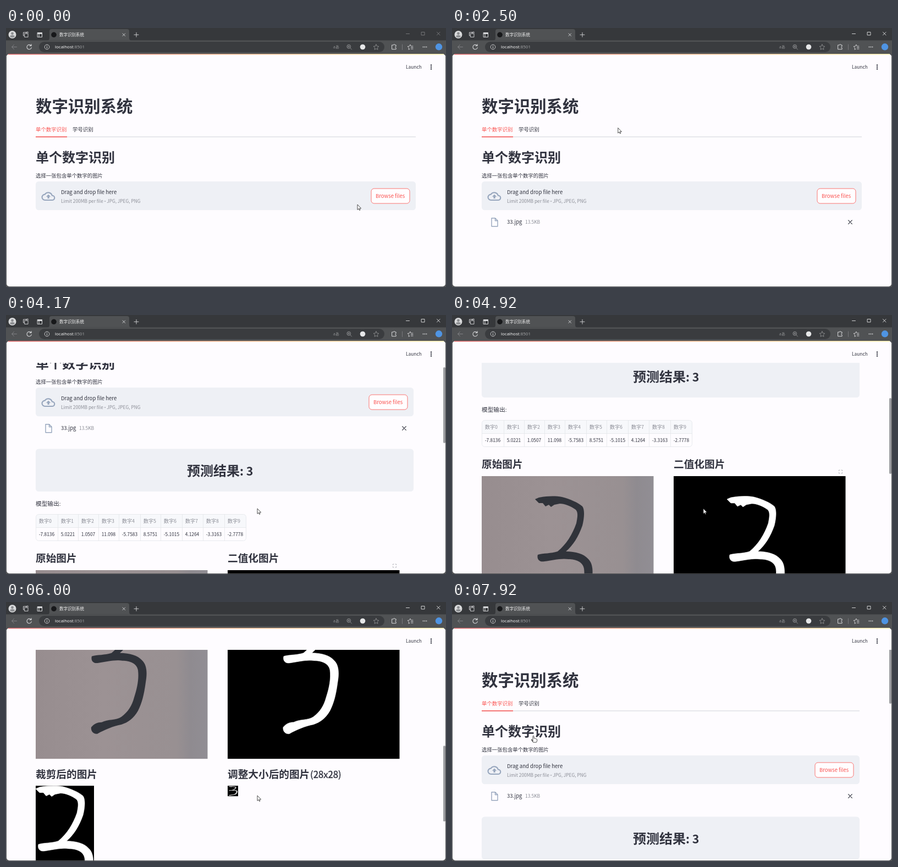
These frames come from a looping animation (800 px wide and 471 px high, 8 s). An HTML page:

```html
<!DOCTYPE html>
<html lang="zh-CN">
<head>
<meta charset="utf-8">
<title>数字识别系统</title>
<style>
html, body { margin: 0; width: 100%; height: 100%; overflow: hidden; background: #505254; }
svg { position: absolute; left: 0; top: 0; width: 800px; height: 471px; display: block; }
text { white-space: pre; }
.page { font-family: "Noto Sans CJK SC", "Noto Sans CJK JP", sans-serif; fill: #31333f; }
.ui { font-family: "Open Sans", "Noto Sans CJK SC", sans-serif; fill: #1c1c1e; }
.line { fill: none; stroke-linecap: round; stroke-linejoin: round; }
#dialog { filter: drop-shadow(0 9px 11px rgba(0, 0, 0, .42)); transform-origin: 259px 160px; }
</style>
</head>
<body>
<svg id="stage" viewBox="0 0 800 471"></svg>
<script>
const FPS = 12, FRAMES = 96;
const INK = '#31333f', GREY = '#8b8d96', RED = '#fa5350', BOX = '#eef0f5', STEEL = '#97a6bd';
// Outline of the handwritten digit
const THREE = 'M151 104L158 101C175 98 188 98 200 100C215 104 229 110 237 117C242 124 240 140 237 152' +
  'C230 172 220 188 207 199C225 199 240 204 247 212C256 220 257 235 254 252C251 275 247 290 240 304' +
  'C232 318 222 325 210 329C195 332 180 338 166 346C158 347 154 340 155 334C160 328 166 325 174 325' +
  'C185 319 200 322 210 315C222 306 229 295 233 280C239 262 242 245 240 230C238 218 225 213 212 213' +
  'C198 211 182 215 168 217C158 219 154 212 156 205C166 202 180 203 192 199C208 186 219 168 226 148' +
  'C228 138 230 128 225 123C215 116 205 112 196 112L186 114L180 118L176 114L170 117L165 111L158 111z';

const rect = (x, y, w, h, fill, more = '') =>
  `<rect x="${x}" y="${y}" width="${w}" height="${h}" fill="${fill}" ${more}/>`;
const circle = (x, y, r, fill, more = '') => `<circle cx="${x}" cy="${y}" r="${r}" fill="${fill}" ${more}/>`;
const line = (d, color, w = 1, more = '') =>
  `<path class="line" d="${d}" stroke="${color}" stroke-width="${w}" ${more}/>`;
const text = (x, y, size, s, more = '') => `<text x="${x}" y="${y}" font-size="${size}" ${more}>${s}</text>`;
// Latin runs are set smaller than the Chinese around them
const mixed = (x, y, size, s, more) => text(x, y, size,
  s.replace(/[\x20-\x7e]+/g, m => `<tspan font-size="${size * .895}">${m}</tspan>`), more);
const bold = 'font-weight="700"';
const three = (color, edge, transform) =>
  `<path d="${THREE}" fill="${color}" stroke="${color}" stroke-width="${edge}" transform="${transform}"/>`;

function table() {
  const edges = [54, 94, 131, 168, 205, 244, 281, 320, 358, 397, 437];
  const cells = '-7.8136 5.0221 1.0507 11.098 -5.7583 8.5751 -5.1015 4.1264 -3.3163 -2.7778'.split(' ');
  return rect(54.5, 509.5, 382, 48, '#fefcff', 'rx="5"') +
    `<path d="M54.5 533.5V514q0-4.5 4.5-4.5H432q4.5 0 4.5 4.5V533.5z" fill="#f7f8fb"/>` +
    line('M54.5 533.5H436.5' + edges.slice(1, -1).map(x => `M${x + .5} 509.5V557.5`).join(''), '#e4e6ea', .8) +
    rect(54.5, 509.5, 382, 48, 'none', 'rx="5" stroke="#e4e6ea" stroke-width=".8"') +
    cells.map((v, i) => mixed(edges[i] + 5.7, 524.6, 9.33, '数字' + i, `fill="${GREY}"`) +
      mixed(edges[i] + 5.7, 549, 9.33, v)).join('');
}

function results() {
  return rect(54, 390.5, 687, 77.5, BOX, 'rx="5.3"') +
    mixed(329, 438.6, 24, '预测结果: 3', bold) +
    mixed(54, 493.5, 10.67, '模型输出:') + table() +
    mixed(54, 596, 18.67, '原始图片', bold) + mixed(403, 596, 18.67, '二值化图片', bold) +
    line('M703.5 601.5v-1.5h1.5M708 600h1.5v1.5M709.5 604.5v1.5h-1.5M705 606h-1.5v-1.5', '#a3a4ab', .8) +
    rect(54, 611, 312.5, 329.5, 'url(#paper)') + three('#30333a', .1, 'translate(0 549)') +
    rect(403, 611, 312.5, 329.5, '#000') + three('#fff', .6, 'translate(349 549)') +
    mixed(54, 975, 18.67, '裁剪后的图片', bold) +
    mixed(403, 975, 18.67, '调整大小后的图片', bold) +
    mixed(553, 975, 18.67, '(28x28)', `stroke="${INK}" stroke-width=".4"`) +
    rect(54, 989.5, 106, 249, '#000') +
    `<g clip-path="url(#crop)">${three('#fff', .6, 'translate(-97 891)')}</g>` +
    rect(403, 989.5, 19, 19, '#000') + three('#cfcfcf', 1, 'translate(380.7 983.6) scale(.158 .069)');
}

function page() {
  return `<g class="page" clip-path="url(#view)">${rect(0, 47, 800, 424, '#fefcff')}
  <g id="content">
    ${text(54, 153.2, 29.4, '数字识别系统', bold)}
    ${text(54, 187.5, 9.4, '单个数字识别', `fill="${RED}"`)}${text(121, 187.5, 9.4, '学号识别')}
    ${rect(54, 197.3, 691, 1.3, '#dddee3', 'class="wide"')}${rect(54, 197.2, 57, 1.5, RED)}
    ${text(54, 244.2, 24, '单个数字识别', bold)}
    ${text(54, 271.5, 9.38, '选择一张包含单个数字的图片')}
    ${rect(54, 279, 691, 52.3, BOX, 'rx="5.3" class="wide"')}
    <g transform="translate(64.6 293.3) scale(1.04)">
      ${line('M6 19a5 5 0 0 1-.2-10a7 7 0 0 1 12.7 2a4 4 0 0 1 .5 8z', STEEL, 2)}
      <path d="M8 13h2.5v3h3v-3H16l-4-4z" fill="${STEEL}"/>
    </g>
    ${mixed(100, 302, 10.67, 'Drag and drop file here')}
    ${text(100, 318.3, 8.36, 'Limit 200MB per file <tspan font-family="Noto Sans, sans-serif" font-size="7">•</tspan> JPG, JPEG, PNG', `fill="${GREY}"`)}
    <g id="browse">${rect(664, 292, 70, 27, '#fffdff', `rx="5.3" stroke="${RED}" stroke-width=".8"`)}
      ${mixed(672, 309.2, 10.67, 'Browse files', `fill="${RED}"`)}</g>
    <g id="file">
      ${line('M72 345.8h6.5l4.5 4.5v10.4h-11zM78.5 346v4.5h4.5', STEEL, 1.4)}
      ${mixed(100, 356, 10.67, '33.jpg')}${mixed(133, 355.6, 9.33, '13.5KB', `fill="${GREY}"`)}
      ${line('M720.7 349.7l6.6 6.6m0-6.6l-6.6 6.6', INK, 1.2)}
    </g>
    <g id="results">${results()}</g>
  </g>
  ${rect(795, 47, 4, 138, '#9b9ca0', 'rx="2" id="thumb"')}
  ${rect(0, 47, 800, 40, '#fefcff')}
  ${text(727, 74.2, 8.36, 'Launch')}
  ${[67.5, 71, 74.5].map(y => circle(773, y, 1.2, INK)).join('')}
  </g>${rect(4, 47, 792, 1.5, 'url(#glow)')}`;
}

function browser() {
  const w = '#d8d9db', dim = '#97989a';
  return `<g class="ui">${rect(0, 0, 800, 471, '#505254')}${rect(0, 0, 800, 22.5, '#36383b')}` +
    `<path d="M75 22.5q4 0 4-4V6q0-4 4-4H220q4 0 4 4V18.5q0 4 4 4z" fill="#505254"/>` +
    circle(11.5, 12, 7, '#dadbdc') + circle(11.5, 10, 2.4, '#8b8d90') +
    '<path d="M7 15.5q0-2.5 4.5-2.5t4.5 2.5q-4.5 4-9 0z" fill="#8b8d90"/>' +
    line('M33.5 14h-2v-6h6v2M34 10h6v6.500h-6zM36 8l4-1v2', w, .9) +
    line('M57.5 8.5h8v8h-8zM57.5 10.5h8M60 10.5v6', w, 1) + rect(57.5, 8, 8, 2.5, w) +
    circle(87, 12.3, 4.8, '#17181a') +
    text(97, 15, 7.5, '数字识别系统', 'fill="#f2f2f2"') +
    line('M212 10l4.6 4.6m0-4.6l-4.6 4.6', w, .9) + line('M233 12.3h8m-4-4v8', w, .9) +
    `<g id="buttons" class="line" stroke-width=".9"><path d="M727.5 10.5h6M755.5 7.5h5.5v5.5h-5.5zM783.5 7.5l5.5 5.5m0-5.5l-5.5 5.5"/></g>` +
    line('M19.5 34.5h-9m4-4l-4 4l4 4', '#808184', 1) +
    line('M45.5 32a4.2 4.2 0 1 0 .8 3.5M46 29.5v3h-3', w, 1.1) +
    rect(60, 25, 628, 19, '#3a3c3f', 'rx="9.5"') +
    circle(74.5, 34.5, 4.3, 'none', `stroke="${w}" stroke-width=".9"`) + line('M74.5 34v2.5M74.5 32.3v.1', w, 1) +
    text(89, 37.4, 8, 'localhost<tspan fill="#a9aaac">:8501</tspan>', 'fill="#fff"') +
    text(595, 37.3, 7, 'aあ', `fill="${dim}"`) +
    circle(623.3, 33.7, 3.3, 'none', `stroke="${dim}"`) + line('M626 36.5l2.5 2.5M621.8 33.7h3m-1.5-1.5v3', dim, .9) +
    circle(648.5, 34.5, 4.8, '#e6e7e8') +
    line('M673 29.8l1.5 3.2l3.4.4l-2.5 2.4l.6 3.5l-3-1.7l-3 1.7l.6-3.5l-2.5-2.4l3.4-.4z', dim, .8) +
    line('M702 31h2.5a1.3 1.3 0 0 1 2.6 0h2v2.5a1.3 1.3 0 0 0 0 2.6v2.6h-7.1z', w, 1) +
    line('M720.5 30v9.5', '#7c7d80', .9) +
    line('M734 38.3l-2 1l.5-3.4l-2.4-2.3l3.3-.5l1.5-3l1.5 3h3.5M736.5 35.5h3.5M736.5 38h3.5', w, .9) +
    [758.5, 761.5, 764.5].map(x => circle(x, 34.5, .9, w)).join('') +
    circle(787, 34.3, 6.2, '#4f94e3') + '</g>';
}

function folder(cx, inner = '', lip = 86) {
  const x = cx - 25.5;
  return `<path d="M${x} 118V82.500q0-3 3-3h13q2 0 3 1.500l2 2.500h27q3 0 3 3v31z" fill="#eeb644"/>${inner}` +
    `<path d="M${x} ${lip + 4}q0-2 2-2h16q2 0 3-1l1-1h26.500q2.500 0 2.500 2.500V118q0 3-3 3h-45q-3 0-3-3z" fill="url(#folder)"/>`;
}

function files() {
  const label = (cx, y, s) => text(cx, y, 7.5, s, 'text-anchor="middle"');
  const photo = (x, y, w, h, fill) => rect(x + 1, y + 1, w, h, '#c9c9cc', 'rx="1"') + rect(x, y, w, h, fill);
  const preview = cx => rect(cx - 25.5, 86, 51, 22, '#000') +
    line(`M${cx + 20} 88q-6 2-9 8t-5 8`, '#fff', 3.5);
  return folder(140, rect(131, 89, 21, 18, '#4d545b') + rect(136, 93, 10, 10, '#3f78a8'), 102) + folder(208) +
    folder(276, preview(276), 101) + folder(344, preview(344), 101) +
    label(140, 138.3, '__pycache__') + label(208, 138.3, 'data') +
    label(276, 138.3, 'test_after_padd') + label(276, 148.3, 'ing') +
    label(344, 138.3, 'test_before_pa') + label(344, 148.3, 'dding') +
    photo(386, 74.5, 50, 53, '#fff') + line('M407.5 86q2 8 1 23', '#0b0b0b', 3.4) + label(411, 138.3, '1.jpg') +
    photo(452, 77, 53, 50, 'url(#wall)') + line('M477.5 100q4-4 6 0q0 4-5 7.5q4-1 7 0', '#33343a', 1.2) + label(478, 138.3, '2.jpg') +
    photo(114, 156, 52, 53.5, '#fff') + line('M131 168q8 1 16-1q-3 13-4 30', '#0b0b0b', 4) + label(140, 220, '7.jpg') +
    photo(184, 156, 47, 53, 'url(#wall)') + line('M207 180a2 2.5 0 1 0 0 3v-3q0 4-1 8', '#33343a', 1.2) + label(208, 220, '9.jpg') +
    rect(245, 152.5, 63, 73, '#e7eff8', 'rx="2" id="hover"') +
    photo(249.5, 156, 51.5, 53.5, '#9f9899') + three('#2e3138', 3, 'translate(240.5 146.5) scale(.163)') + label(276, 220, '33.jpg') +
    photo(323, 156, 41, 53.5, 'url(#sheet)') + text(329, 183, 4.6, '1 2 3 4 5 6 7 8', 'fill="#55565a"') + label(344, 220, 'whole.jpg');
}

function sidebar() {
  const chevron = (x, y) => line(`M${x - 1.2} ${y - 2.6}l2.6 2.6l-2.6 2.6`, '#707072', .9);
  const drive = y => rect(28.5, y - 1.8, 9, 3.8, '#56585c', 'rx=".8"');
  const item = (x, y, s) => text(x, y + 2.7, 7.6, s);
  const drives = ['Valdora-SSD', 'Data (D:)', 'Game (G:)', 'Work (W:)'];
  return rect(3, 223, 84, 19, '#d9d9da') +
    rect(23.5, 73, 10, 8, '#fbcf55', 'rx="1"') + rect(23.5, 72, 5, 2, '#e8ae3a') + item(36, 77, 'Experience') +
    line('M9 96.5H82', '#dfdfe2', .8) +
    circle(28.5, 116, 4, '#1e86d8') + item(36, 116, 'PeloNube') +
    circle(28.5, 135.5, 4, '#3aa0ea') + item(36, 135.5, 'QLT云盘') +
    rect(23.5, 150.5, 10, 7, '#2f86c5', 'rx="1"') + rect(26, 158, 5, 1.2, '#6b7680') + item(36, 154.8, '此电脑') +
    `<g clip-path="url(#tree)">${drives.map((s, i) => {
      const y = 174.3 + i * 19.5;
      return chevron(18, y) + drive(y) + item(40.5, y, s);
    }).join('')}</g>` + rect(28.5, 170, 4, 2, '#1e86d8') +
    rect(23.5, 248, 8, 6, '#2f86c5') + circle(31, 254, 2.8, '#3fa7d8') + item(36, 252.3, '网络') +
    [116, 135.5, 252.3].map(y => chevron(13, y)).join('') +
    line('M10.5 153.5l2.6 2.6l2.6-2.6', '#444', .9) +
    rect(91, 196, 3, 49, '#8c8c8e', 'rx="1.5"');
}

function dialog() {
  const button = (x, w, s, edge) => rect(x, 291.5, w, 15, '#fdfdfd', `rx="2" stroke="${edge}" stroke-width=".9"`) +
    text(x + w / 2, 301.8, 7.5, s, 'text-anchor="middle"');
  const crumb = (x, s) => text(x, 34.2, 7.6, s);
  const arrow = x => line(`M${x} 29.3l2 2.2l-2 2.2`, '#555', .8);
  return `<g id="dialog" class="ui">${rect(3, -4, 512, 324, '#f0f0f3', 'rx="3"')}
    ${rect(3, -4, 512, 71, '#f0f4fa')}${rect(3, 67, 512, 199, '#fefdff')}
    ${circle(11, 7, 4.3, '#2490c8')}${text(20, 9.8, 7.4, '打开')}
    ${line('M502 4.3l5 5m0-5l-5 5', '#333', .9)}
    ${line('M20 31.5h-8m3.5-3.5l-3.5 3.5l3.5 3.5M33 31.5h8m-3.5-3.5l3.5 3.5l-3.5 3.5', '#b0b3b8', .9)}
    ${line('M53 30.3l2.5 2.5l2.5-2.5M74 35.5v-8m-3.5 3.5l3.5-3.5l3.5 3.5', '#4b4d52', .9)}
    ${rect(88, 21.5, 290, 20, '#fcfdff', 'rx="2" stroke="#e3e7ee" stroke-width=".7"')}
    ${rect(92, 28, 9, 7, '#fbcf55', 'rx="1"')}${rect(92, 27, 4.5, 2, '#e8ae3a')}
    ${crumb(105, '«')}${crumb(113, 'CV')}${arrow(127)}${crumb(134, 'ComputerVIsion')}${arrow(196.5)}
    ${crumb(206.5, 'Experience')}${arrow(250)}${crumb(259.5, 'Task-3')}${arrow(288)}
    ${line('M342 30.3l2.8 2.8l2.8-2.8', '#555', .9)}
    ${line('M370.5 29.5a3.4 3.4 0 1 0 .8 3M371 27.5v2.5h-2.5', '#444', .9)}
    ${rect(386, 21.5, 122, 20, '#fcfdff', 'rx="2" stroke="#e3e7ee" stroke-width=".7"')}
    ${text(391, 34.2, 7.4, '在 Task-3 中搜索', 'fill="#6a6b70"')}
    ${circle(497, 30.5, 2.4, 'none', 'stroke="#444" stroke-width=".9"')}${line('M495.2 32.3l-2.2 2.5', '#444', .9)}
    ${text(13, 60, 7.4, '组织')}<path d="M30 56h4.5l-2.25 2.5z" fill="#444"/>${text(52, 60, 7.4, '新建文件夹')}
    ${rect(442, 54, 7, 6, 'none', 'rx="1" stroke="#444" stroke-width=".9"')}<path d="M456 56h4.5l-2.25 2.5z" fill="#444"/>
    ${rect(474.5, 53.5, 8.5, 7, '#fff', 'stroke="#33536e" stroke-width=".9"')}${rect(479, 54, 4, 6, '#2f7fb8')}
    ${circle(501, 57, 4.5, '#1671c2')}${text(501, 59.7, 7, '?', 'text-anchor="middle" fill="#fff"')}
    ${line('M97.5 67V266', '#ececef', .8)}
    ${sidebar()}${files()}
    ${text(120, 283.4, 7.4, '文件名(N):', 'text-anchor="end"')}
    ${rect(123.5, 274, 257, 13.5, '#fff', 'stroke="#4a8fc4" stroke-width=".9" rx="1"')}
    ${text(127, 283.5, 7.4, '33.jpg', 'id="name"')}${line('M373.5 279.5l2.5 2.5l2.5-2.5', '#666', .8)}
    ${rect(387, 274, 115, 13.5, '#fdfdfd', 'stroke="#d5d5d9" stroke-width=".8" rx="1"')}
    <g clip-path="url(#kind)">${text(390, 283.5, 7.4, '自定义文件 (*.jpg;*.jpeg;*.png)')}</g>
    ${line('M494.5 279.5l2.5 2.5l2.5-2.5', '#666', .8)}
    ${button(322.5, 57.5, '从移动设备上传', '#dcdce0')}${button(388.5, 52, '打开(O)', '#3a86c0')}${button(449.5, 52, '取消', '#dcdce0')}
    ${line('M507 318l6-6M510 318l3-3', '#a8a8ac', .8)}
  </g>`;
}

const clip = (id, x, y, w, h, r = 0) => `<clipPath id="${id}"><rect x="${x}" y="${y}" width="${w}" height="${h}" rx="${r}"/></clipPath>`;
const gradient = (id, dir, ...stops) => `<linearGradient id="${id}" ${dir}>${stops.map(([o, c]) =>
  `<stop offset="${o}" stop-color="${c}"/>`).join('')}</linearGradient>`;
const defs = clip('view', 1, 47.5, 798, 422.5, 5) + clip('crop', 54, 989.5, 106, 249) +
  clip('tree', 3, 160, 84, 90) + clip('kind', 387, 270, 104, 20) +
  gradient('paper', '', [0, '#978d8f'], [.4, '#9c9294'], [.82, '#989092'], [.9, '#8f8b90'], [1, '#918e94']) +
  gradient('wall', 'y2=".3"', [0, '#b4b1ae'], [1, '#a39f9e']) +
  gradient('sheet', '', [0, '#a9abad'], [.3, '#cfcfce'], [.7, '#c4c4c4'], [1, '#a3a3a5']) +
  gradient('glow', '', [0, '#d9686a'], [.5, '#eeb58c'], [1, '#f8f0b0']) +
  gradient('folder', 'x2="0" y2="1"', [0, '#fde08a'], [1, '#f9c847']);

const pointer = `<g id="arrow"><path d="M0 0V9.5L2.2 7.5L3.6 10.5L5 9.9L3.7 7H6.6z" fill="#fff" stroke="#222" stroke-width=".8"/></g>
  <g id="hand"><path d="M-1 5.5V-3.5q0-1.3 1-1.3t1 1.3V0q2-.6 2.3.5q1.7-.3 1.9.7q1.6 0 1.6 1.5q0 2.5-1.4 4.5H-.5L-3.6 3q-.4-1.3 1-1.2z" fill="#fff" stroke="#222" stroke-width=".8"/></g>`;

const $ = id => document.getElementById(id);
$('stage').innerHTML = `<defs>${defs}</defs>` + browser() + page() + dialog() + pointer;

// Stops are [frame, value, ...]
const SCROLL = [[42, 0], [43, 10], [45, 82], [48, 137], [49, 137], [50, 147], [53, 274], [56, 274], [57, 281], [59, 318],
  [62, 411], [63, 411], [64, 425], [66, 549], [68, 549], [69, 559], [71, 640], [74, 686], [83, 686], [84, 676],
  [86, 549], [87, 549], [88, 525], [90, 290], [92, 70], [94, 0]];
const MOUSE = [[7, 639, 321], [10, 570, 298], [14, 375, 222], [17, 295, 181], [29, 295, 181], [34, 329, 184],
  [35, 329, 184], [38, 460, 351], [48, 460, 351], [50, 457, 352], [89, 457, 352], [94, 148, 248]];
const FADE = [[2, 0], [4, .9], [5, 1], [22, 1], [25, 0]];

function at(stops, f, k = 1) {
  const i = stops.findIndex(s => s[0] > f);
  if (i === 0) return stops[0][k];
  if (i < 0) return stops[stops.length - 1][k];
  const a = stops[i - 1], b = stops[i];
  return a[k] + (b[k] - a[k]) * (f - a[0]) / (b[0] - a[0]);
}
const show = (id, on) => $(id).style.display = on ? '' : 'none';

function draw(f) {
  const y = at(SCROLL, f), fade = at(FADE, f), loaded = f >= 32;
  $('content').setAttribute('transform', `translate(0 ${-y})`);
  $('thumb').setAttribute('y', 47 + y * .327);
  $('browse').setAttribute('transform', `translate(${loaded ? -4 : 0} 0)`);
  document.querySelectorAll('.wide').forEach(e => e.setAttribute('width', loaded ? 687 : 691));
  show('file', f >= 30);
  show('results', loaded);
  show('thumb', loaded);
  $('buttons').setAttribute('stroke', f >= 28 ? '#e4e4e5' : '#7d7e81');

  show('dialog', fade > 0);
  $('dialog').style.opacity = fade;
  $('dialog').style.transform = `scale(${.96 + .04 * fade})`;
  show('hover', f >= 17);
  $('hover').setAttribute('fill', f >= 21 ? '#cce6fb' : '#e7eff8');
  show('name', f >= 21);

  const hand = f >= 94;
  show('arrow', !hand);
  show('hand', hand);
  $(hand ? 'hand' : 'arrow').setAttribute('transform', `translate(${at(MOUSE, f)} ${at(MOUSE, f, 2)})`);
}

let last = -1;
const start = performance.now();
function tick() {
  const f = Math.floor((performance.now() - start + 5) * FPS / 1000) % FRAMES;
  if (f !== last) draw(last = f);
  requestAnimationFrame(tick);
}
tick();
</script>
</body>
</html>
```
